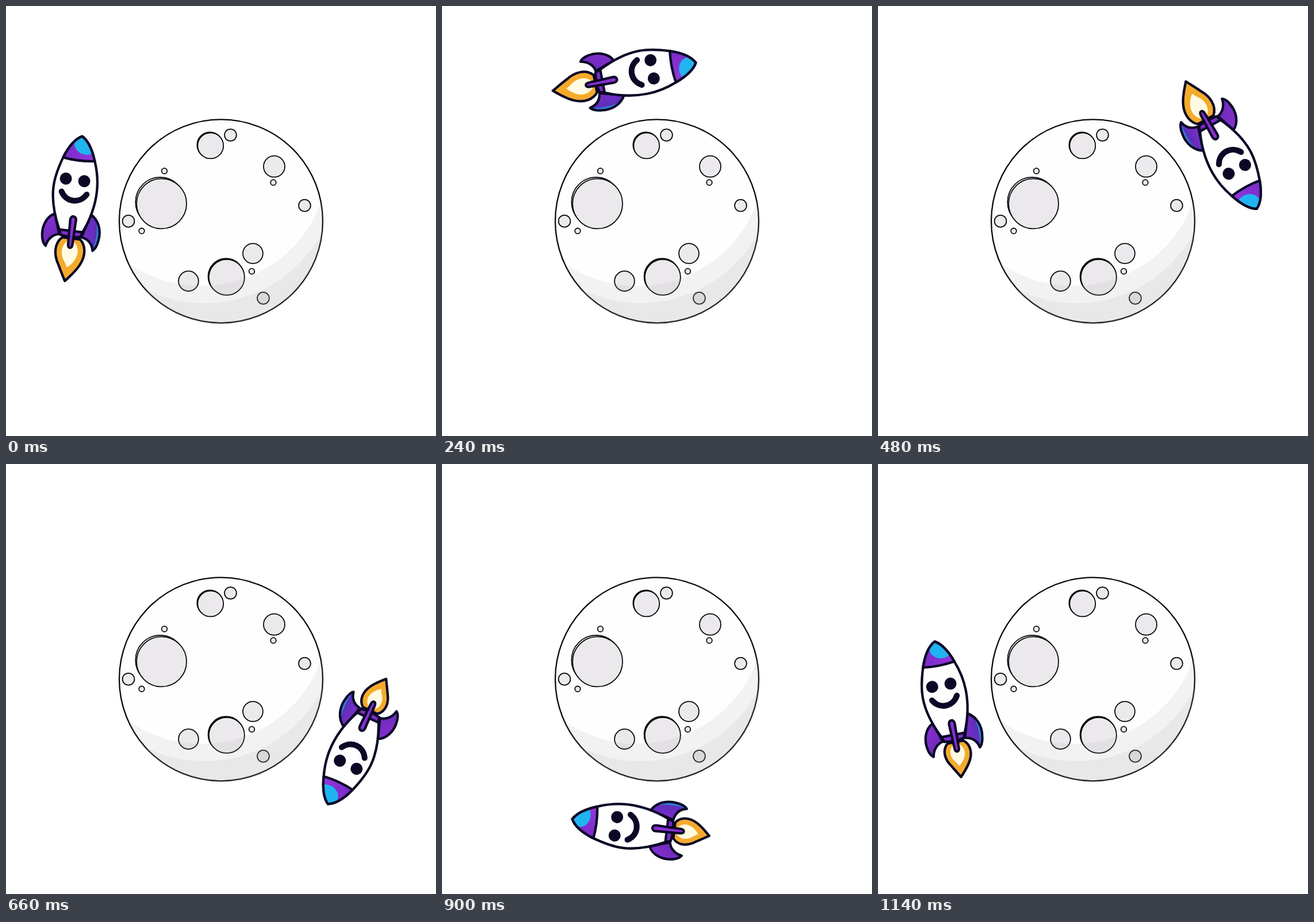
Write an HTML page that moves like this. It is 748x748 px and loops after 1.2 s.

```html
<!DOCTYPE html>
<html lang="en">
<head>
<meta charset="utf-8">
<title>Rocket around the moon</title>
<style>
  html, body { margin: 0; width: 100%; height: 100%; overflow: hidden; background: #fff; }
  svg { display: block; width: 100vw; height: 100vh; }
</style>
</head>
<body>
<svg viewBox="0 0 748 748">
  <defs>
    <linearGradient id="finFill" x1="0" y1="0" x2="0.5" y2="1">
      <stop offset="0" stop-color="#8c30d6"/>
      <stop offset="1" stop-color="#6a2ab6"/>
    </linearGradient>
    <linearGradient id="finFillRight" x1="0" y1="0" x2="1" y2="0">
      <stop offset="0" stop-color="#7e2ccb"/>
      <stop offset="1" stop-color="#5530b4"/>
    </linearGradient>
    <linearGradient id="noseFill" x1="0" y1="0" x2="1" y2="0">
      <stop offset="0" stop-color="#7a2cc8"/>
      <stop offset="1" stop-color="#9436dc"/>
    </linearGradient>
    <path id="hull" d="M0 1.500C-13 8-22.500 25-28.500 42C-34.500 60-39 78-39 95C-39 118-32 142-20 167L21 167C32 142 37 118 37 95C37 78 33 58 27 42C21 25 12 8 0 1.500Z"/>
    <path id="nose" d="M0 1.500C-13 8-22.500 25-28.500 42Q-1 46 27 42C21 25 12 8 0 1.500Z"/>
    <path id="finRight" d="M32 135C46 143 53 160 50 178C49 188 45 195 42 197C40 186 33 178 20 176Z"/>
    <clipPath id="noseClip"><use href="#nose"/></clipPath>
    <clipPath id="finClip"><use href="#finRight"/></clipPath>
    <clipPath id="moonClip"><circle cx="374" cy="374.3" r="178"/></clipPath>
  </defs>

  <g id="moon" stroke="#08080c" stroke-width="1.8">
    <circle cx="374" cy="374.3" r="177" fill="#fefefe" stroke-width="2.3"/>
    <g id="craters" fill="#ebe9eb"></g>
    <g id="shade" fill="#98989e" fill-opacity="0.12" fill-rule="evenodd" stroke="none" clip-path="url(#moonClip)"></g>
  </g>

  <g id="rocket" stroke="#0b0826" stroke-width="4.3" stroke-linejoin="round" stroke-linecap="round">
    <g id="flame">
      <path vector-effect="non-scaling-stroke" fill="#f4ab2c" d="M-13 180C-26 192-24 212-14 228C-8 240-2 250 .5 255C6 248 18 236 24 222C32 204 28 188 18 180Z"/>
      <path stroke="none" fill="#fffbe3" d="M-4 186C-14 196-12 210-6 219Q-1 226 1 231Q8 226 13 217C19 205 18 195 9 186Z"/>
    </g>
    <path fill="url(#finFill)" d="M-31 141C-44 147-52 165-47.500 185C-46 192-43 196-40 198C-38 186-30 177-19 175Z"/>
    <use href="#finRight" fill="url(#finFillRight)" stroke="none"/>
    <path clip-path="url(#finClip)" fill="#2b82dc" stroke="none" d="M42 138C62 160 54 190 42 199C45 184 49 162 40 140Z"/>
    <use href="#finRight" fill="none"/>
    <path fill="#7c2cc9" d="M-20 165L-17 176Q1 179 18 176L21 165Z"/>
    <use href="#hull" fill="#fefefe"/>
    <use href="#nose" fill="url(#noseFill)" stroke="none"/>
    <ellipse cx="9" cy="14" rx="21" ry="18.500" fill="#20b4f0" stroke="none" clip-path="url(#noseClip)"/>
    <use href="#nose" fill="none"/>
    <g fill="#0b0826" stroke="none">
      <circle cx="-19.3" cy="78" r="10.5"/>
      <circle cx="13" cy="78.5" r="10.5"/>
    </g>
    <path fill="none" stroke-width="10" d="M-24 101C-14 119 10 119 20 101"/>
    <path fill="#8a2fd4" d="M-3 148C-3 139.500 7 139.500 7 148L6 191C6 198.500-1.500 198.500-1.500 191Z"/>
  </g>
</svg>
<script>
  const STEP = 60, STEPS = 20;
  const NS = "http://www.w3.org/2000/svg";
  const byId = id => document.getElementById(id);

  function add(parent, tag, attrs) {
    const el = document.createElementNS(NS, tag);
    for (const key in attrs) el.setAttribute(key, attrs[key]);
    parent.append(el);
  }

  const disc = (cx, cy, r, fill) =>
    add(byId("craters"), "circle", fill ? { cx, cy, r, fill } : { cx, cy, r });

  // Rims that peek out behind the three deepest craters
  disc(354.8, 241.8, 22.4, "#08080c");
  disc(382.8, 470.4, 31.2, "#08080c");
  disc(268.3, 341, 43, "#fefefe");
  [
    [355.8, 243, 22.4], [390.5, 224.5, 10.4], [466.5, 279.2, 18.5],
    [465, 307, 4.8], [519.5, 347, 10.4], [275.5, 287, 4.8],
    [270.6, 343.8, 43.5], [213, 374.2, 10.4], [236, 391.3, 4.8],
    [317.5, 478.6, 17.4], [383.9, 471.9, 31], [429.5, 430.5, 17.4],
    [427.5, 461.5, 4.8], [447.5, 508.2, 10.4]
  ].forEach(c => disc(...c));

  // Everything outside a lit circle is darkened
  const shadow = (cx, cy, r) => add(byId("shade"), "path", {
    d: `M0 0H748V748H0ZM${cx - r} ${cy}a${r} ${r} 0 1 0 ${2 * r} 0a${r} ${r} 0 1 0 ${-2 * r} 0Z`
  });
  shadow(340, 265.5, 221.5);
  shadow(345, 285, 232);

  const rocket = byId("rocket"), flame = byId("flame");

  function draw(time) {
    const step = Math.floor(time / STEP) % STEPS;
    rocket.setAttribute("transform",
      `rotate(${step * 360 / STEPS} 375.2 375.2) translate(132.8 225.2) rotate(7)`);
    flame.setAttribute("transform",
      step % 2 ? "translate(2 180) scale(.9 .82) translate(-2.5 -180)" : "");
  }

  const start = performance.now();
  function tick() {
    draw(performance.now() - start);
    requestAnimationFrame(tick);
  }
  tick();
</script>
</body>
</html>
```
